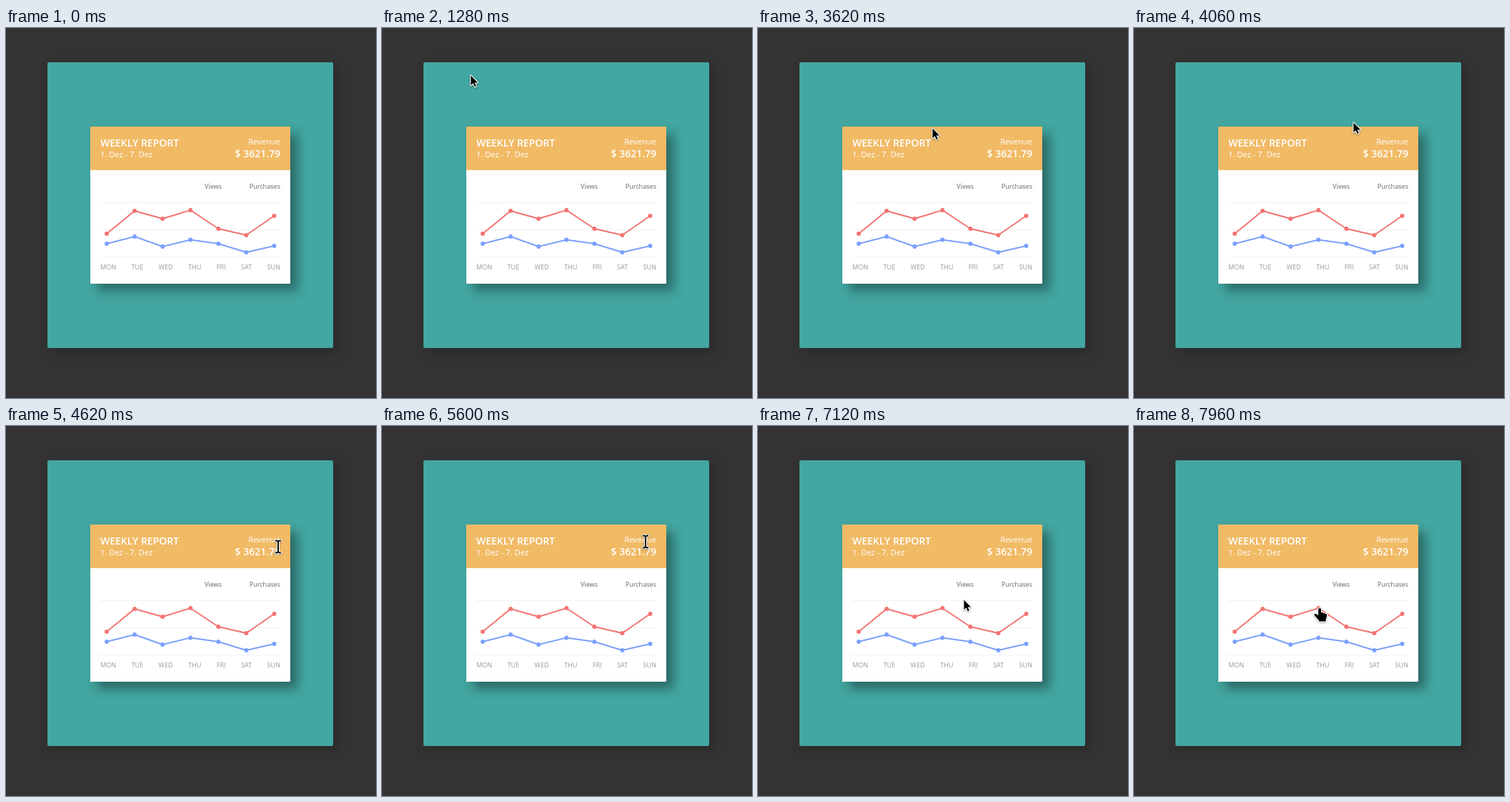
Recreate the animation shown at these times as an HTML page. Size 518x518 px, loop 8 s.

```html
<!DOCTYPE html>
<html lang="en">
<head>
<meta charset="utf-8">
<title>Weekly report</title>
<style>
  html, body { margin: 0; width: 100%; height: 100%; overflow: hidden; background: #333; }
  body { position: relative; font: 11.2px/15px "Open Sans", sans-serif; color: #fff; }
  .panel, .card, .head, .text, svg { position: absolute; }
  .panel {
    left: 58px; top: 48px; width: 400px; height: 400px; border-radius: 2px;
    background: #43a6a0; box-shadow: 5px 5px 16px rgba(0, 0, 0, .2);
  }
  .card {
    left: 118px; top: 138px; width: 280px; height: 220px;
    background: #fff; box-shadow: 10px 10px 14px rgba(0, 0, 0, .36);
  }
  .head { left: 118px; top: 138px; width: 280px; height: 61px; background: #f1ba65; }
  .text { white-space: pre; }
  .left { left: 132px; }
  .right { right: calc(100% - 384px); }
  .big { font-size: 14px; line-height: 19px; font-weight: 600; }
  .small { font-size: 9.1px; line-height: 13px; color: #666; }
  .days { top: 328px; width: 252px; display: flex; justify-content: space-between; color: #999; }
  svg { left: 0; top: 0; width: 518px; height: 518px; pointer-events: none; }
  circle { pointer-events: all; }
  .grid { stroke: #f0f0f0; }
  .line { fill: none; stroke-width: 2; stroke-linejoin: round; }
  #cursor { filter: drop-shadow(0 1px 1px rgba(0, 0, 0, .35)); }
  #cursor > * { visibility: hidden; }
  #cursor > .on { visibility: visible; }
  .solid { fill: #000; stroke: #fff; stroke-width: 2.2; stroke-linejoin: round; paint-order: stroke; }
  #beam { fill: none; stroke-linecap: round; }
</style>
</head>
<body>
<div class="panel"></div>
<div class="card"></div>
<div class="head"></div>

<div class="text left big" style="top:151px">WEEKLY REPORT</div>
<div class="text left" style="top:169px">1. Dez - 7. Dez</div>
<div class="text right" style="top:151px">Revenue</div>
<div class="text right big" style="top:166px">$ 3621.79</div>
<div class="text small" style="top:215px;right:calc(100% - 302px)">Views</div>
<div class="text small right" style="top:215px">Purchases</div>
<div class="text small left days">
  <span>MON</span><span>TUE</span><span>WED</span><span>THU</span><span>FRI</span><span>SAT</span><span>SUN</span>
</div>

<svg viewBox="0 0 518 518">
  <defs>
    <path id="bar" d="M-3.3-8.5Q0-8.5 0-6.5Q0-8.5 3.3-8.5M0-7V7M-3.3 8.5Q0 8.5 0 6.5Q0 8.5 3.3 8.5"/>
  </defs>
  <g id="chart"></g>
  <g id="cursor">
    <path id="arrow" class="solid" d="M.4 1.6V15.2L3.6 12.3L5.7 17.3L7.8 16.4L5.7 11.5H10.1Z"/>
    <g id="beam">
      <use href="#bar" stroke="#fff" stroke-width="4"/>
      <use href="#bar" stroke="#000" stroke-width="1.9"/>
    </g>
    <path id="hand" class="solid" d="M0 3Q0 1 2 1Q4 1 4 3V7.5Q4.5 6.6 6 7Q7 7.3 7.3 8.3Q8.6 7.4 9.6 9Q11.8 8.2 12 10.5Q12.3 13.5 10.8 16L10.3 19.5H1.3Q.5 17.5-1.5 15.5Q-3.5 13.5-5.5 10.5Q-6 8.7-4.2 8.7Q-2 9.2 0 11.2Z"/>
  </g>
</svg>

<script>
const LOOP = 8000, JUMP = 60;
const $ = id => document.getElementById(id);

// Chart: grid lines, then one line with dots per series
const dayX = i => 141 + 39.08 * i;
const gridLine = i => `<path class="grid" d="M132 ${244.5 + 38.2 * i}h252"/>`;
const series = (color, ...ys) =>
  `<polyline class="line" stroke="${color}" points="${ys.map((y, i) => [dayX(i), y])}"/>` +
  ys.map((y, i) => `<circle cx="${dayX(i)}" cy="${y}" r="3" fill="${color}"/>`).join('');
$('chart').innerHTML = [0, 1, 2].map(gridLine).join('') +
  series('#f37473', 288, 256, 267, 255, 281, 290, 263) +
  series('#7aa1fb', 302, 292, 306, 296.5, 302, 314, 305);

// Stops of the pointer: leaves at, arrives at, x, y
const stops = [
  [0, 0, 101, -6],
  [840, 1280, 124, 65],
  [1700, 2360, 171, 173],
  [2640, 2660, 171, 178],
  [3080, 3620, 244, 139],
  [3640, 3780, 296, 125],
  [3900, 4620, 381, 169],
  [4900, 5060, 375, 165],
  [5200, 5340, 370, 161],
  [5600, 6180, 337, 212],
  [6300, 6320, 315, 227],
  [6440, 6720, 290, 241],
  [7120, 7420, 265, 253],
  [7820, 7960, 258, 254]
];
const ease = u => u * u * (3 - 2 * u);

// The pointer moves in small jumps, the last one landing on the stop
function pointerAt(t) {
  const n = stops.findLastIndex(([start]) => start <= t);
  const [start, end, x, y] = stops[n];
  if (t >= end) return [x, y];
  const [, , x0, y0] = stops[n - 1];
  const gaps = Math.round((end - start) / JUMP);
  const u = ease((Math.floor((t - start) / (end - start) * gaps) + 1) / (gaps + 1));
  return [Math.round(x0 + (x - x0) * u), Math.round(y0 + (y - y0) * u)];
}

// Its shape follows what lies beneath it
function shapeAt(x, y) {
  const below = document.elementFromPoint(x, y);
  if (below?.matches('circle')) return 'hand';
  return below?.closest('.text') ? 'beam' : 'arrow';
}

function draw() {
  const [x, y] = pointerAt(performance.now() % LOOP);
  const shape = y < 0 ? '' : shapeAt(x, y);
  $('cursor').setAttribute('transform', `translate(${x} ${y})`);
  for (const id of ['arrow', 'beam', 'hand']) $(id).classList.toggle('on', id === shape || (id === 'arrow' && y > -6 && !shape));
  requestAnimationFrame(draw);
}
draw();
</script>
</body>
</html>
```
